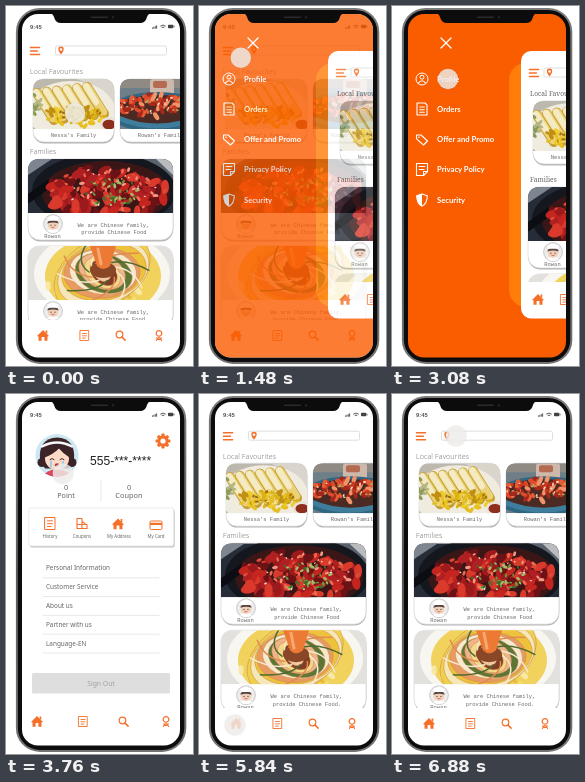
An HTML page that plays this animation: 187 by 360 pixels, repeating every 6.92 s.

```html
<!DOCTYPE html>
<html lang="en">
<head>
<meta charset="utf-8">
<title>Food app walkthrough</title>
<style>
html, body { margin: 0; width: 100%; height: 100%; overflow: hidden; background: #fff; }
svg { display: block; width: 187px; height: 360px; }
.sans { font-family: "Noto Sans", "Open Sans", sans-serif; }
.light { font-family: "Open Sans", sans-serif; font-weight: 300; letter-spacing: .16px; }
.serif { font-family: "Noto Serif", serif; }
.mono { font-family: "Liberation Mono", monospace; }
.bold { font-family: Lato, sans-serif; font-weight: 700; }
.arial { font-family: "Liberation Sans", Arial, sans-serif; }
.line { fill: none; stroke-linecap: round; stroke-linejoin: round; }
</style>
</head>
<body>
<svg id="stage" viewBox="0 0 187 360" xmlns="http://www.w3.org/2000/svg"></svg>
<script>
const LOOP = 6920;
const ORANGE = '#f4702a';

// ---- drawing helpers ----
const text = (x, y, s, cls, size, fill = '#666', anchor = 'start') =>
  `<text x="${x}" y="${y}" class="${cls}" font-size="${size}" fill="${fill}" text-anchor="${anchor}">${s}</text>`;
const rect = (x, y, w, h, r, fill, extra = '') =>
  `<rect x="${x}" y="${y}" width="${w}" height="${h}" rx="${r}" fill="${fill}" ${extra}/>`;
const circle = (x, y, r, fill, extra = '') =>
  `<circle cx="${x}" cy="${y}" r="${r}" fill="${fill}" ${extra}/>`;
const oval = (x, y, rx, ry, fill, extra = '') =>
  `<ellipse cx="${x}" cy="${y}" rx="${rx}" ry="${ry}" fill="${fill}" ${extra}/>`;
const line = (d, color = ORANGE, width = 1) =>
  `<path class="line" d="${d}" stroke="${color}" stroke-width="${width}"/>`;
const shape = (d, fill) => `<path d="${d}" fill="${fill}"/>`;
const at = (x, y, body) => `<g transform="translate(${x} ${y})">${body}</g>`;
const use = (id, x, y) => `<use href="#${id}" x="${x}" y="${y}"/>`;
const repeat = (n, fn) => Array.from({ length: n }, (_, i) => fn(i)).join('');

let seed = 7;
const rnd = (a, b) => {
  seed = (seed * 16807) % 2147483647;
  return a + (b - a) * seed / 2147483647;
};
// Scatters small tilted ovals inside an elliptical area.
const scatter = (n, cx, cy, w, h, size, colors) => repeat(n, i => {
  const a = rnd(0, 6.283), d = Math.sqrt(rnd(0, 1));
  const x = (cx + Math.cos(a) * d * w).toFixed(1), y = (cy + Math.sin(a) * d * h).toFixed(1);
  const r = rnd(size * .6, size);
  return oval(x, y, r.toFixed(1), (r * .55).toFixed(1), colors[i % colors.length],
    `transform="rotate(${rnd(0, 180).toFixed(0)} ${x} ${y})"`);
});

// ---- food pictures ----
const rolls = () =>
  rect(0, 0, 81, 51, 0, '#bdb8ae') +
  shape('M44 0 H81 V26 Q66 8 44 0Z', '#d9d5cd') +
  oval(38, 32, 44, 30, '#efebdf') +
  repeat(6, i => {
    const x = 4 + i * 10, y = 14 - i * 1.2;
    return line(`M${x} ${y} L${x + 17} ${y + 27}`, '#c59f35', 10) +
      line(`M${x} ${y} L${x + 16} ${y + 25}`, '#ead27a', 8.4) +
      line(`M${x - 1} ${y - 1} L${x + 9} ${y + 15}`, '#f4ebc4', 6);
  }) +
  scatter(60, 40, 38, 33, 10, 4, ['#dcb114', '#f0cb2c', '#c08f12', '#e8bf20']) +
  scatter(14, 46, 36, 24, 9, 2, ['#f6e7a0', '#9a6a14']) +
  scatter(10, 3, 30, 6, 16, 4, ['#8d9a58', '#b4b886']) +
  oval(76, 45, 9, 7, '#e9e2d8') + oval(76, 45.5, 6.5, 4.8, '#8e2f1e');

const skillet = () =>
  rect(0, 0, 81, 51, 0, '#6f7f88') +
  rect(0, 0, 81, 9, 0, '#8f8a84') +
  rect(30, 0, 24, 22, 3, '#cdb8ac') + rect(33, 2, 14, 7, 2, '#b56a52') +
  oval(38, 33, 50, 20, '#2f6681') + oval(38, 31, 45, 15, '#4a2a22') +
  scatter(70, 36, 27, 40, 11, 4.6, ['#c8371f', '#e65c34', '#f0956a', '#a3271a', '#dc4a2c']) +
  scatter(24, 36, 26, 36, 10, 1.7, ['#a8b465', '#f8dcc0']) +
  line('M-8 36 Q36 58 84 36', '#3f7d9c', 5);

const pan = () =>
  rect(0, 0, 145, 55, 0, '#262c38') +
  shape('M0 0 H24 L0 16Z', '#7d868f') + shape('M108 0 H145 V30Z', '#59616c') +
  shape('M128 0 H145 V16Z', '#b9bbbd') +
  oval(76, 32, 72, 38, '#14171d') + oval(78, 34, 64, 32, '#3a1716') +
  line('M0 40 L22 24', '#0b0d12', 8) +
  scatter(115, 80, 34, 62, 25, 8, ['#9c1a1c', '#c4251f', '#d93a2b', '#6b1216', '#b01f22']) +
  scatter(40, 80, 31, 58, 22, 3, ['#ef6a50', '#f29a84', '#e04a38']) +
  scatter(45, 82, 33, 30, 15, 2.5, ['#6f9440', '#a3bf68', '#46692e']) +
  scatter(14, 82, 31, 50, 18, 1.6, ['#f5ddd0']);

const spiral = () => {
  const tones = ['#f0cf4c', '#f6e7b8', '#eec23a', '#e79a62', '#f7e9cf', '#5d7636', '#efb48c', '#f3d88a', '#7e3d24', '#f1c9a6'];
  return rect(0, 0, 145, 57, 0, '#e3e1dd') +
    oval(74, 28, 68, 44, '#f8f6f1') + oval(75, 30, 58, 40, '#f1d25c') +
    scatter(36, 75, 40, 56, 18, 5, ['#f5dd74', '#e8bd3a', '#f8e8a6']) +
    tones.map((c, i) => oval(75 + (i % 3) - 1, 26 + (i % 2), 52 - i * 4.6, 34 - i * 2.9, c,
      `stroke="#c98a48" stroke-width=".5" transform="rotate(${i * 9 - 30} 75 26)"`)).join('') +
    repeat(10, i => {
      const a = i * .628;
      const p = (r, b) => `${(75 + Math.cos(a + b) * r).toFixed(1)} ${(26 + Math.sin(a + b) * r * .64).toFixed(1)}`;
      return line(`M${p(14, 0)} Q${p(32, .5)} ${p(46, 1.2)}`, ['#f7ead0', '#e08a50', '#4f6b30'][i % 3], 1.5);
    }) +
    oval(75, 24, 13, 8, '#8a4728') +
    shape('M62 0 Q75 -8 88 0 L82 20 Q75 26 69 20Z', '#ec7a35') +
    line('M70 3 L73 18', '#f7a870', 3);
};

// ---- icons, each centred on 0,0 ----
const icons = {
  menu: line('M-4.6 -3.5 H4.6 M-4.6 0 H2.4 M-4.6 3.5 H4.6', ORANGE, 1.4),
  pin: shape('M0 4 C-4 -.5 -3.2 -4 0 -4 C3.2 -4 4 -.5 0 4Z', ORANGE) + circle(0, -1.1, 1.3, '#fff'),
  home: shape('M-6 .4 L0 -5.4 L6 .4 L4.5 .9 V5.2 H1.4 V1.6 H-1.4 V5.2 H-4.5 V.9Z', ORANGE) + rect(2.6, -5, 1.7, 3, 0, ORANGE),
  doc: line('M-4.2 -5 H4.2 V5 H-4.2Z M-2 -2 H2 M-2 .3 H2 M-2 2.6 H.8', ORANGE, .9),
  find: circle(-1, -1, 3.3, 'none', `stroke="${ORANGE}" stroke-width="1.2"`) + line('M1.6 1.6 L4.6 4.6', ORANGE, 1.5),
  user: circle(0, -2.1, 2.8, 'none', `stroke="${ORANGE}" stroke-width="1.2"`) + line('M-2.6 5 Q0 -.8 2.6 5 M-2.3 2.4 Q0 5.8 2.3 2.4', ORANGE, 1.1),
  gear: repeat(8, i => `<rect x="-1.6" y="-7.4" width="3.2" height="4" rx=".7" fill="${ORANGE}" transform="rotate(${i * 45})"/>`) +
    circle(0, 0, 4.1, 'none', `stroke="${ORANGE}" stroke-width="3"`),
  chef: circle(0, 0, 9.4, '#efeceb', 'stroke="#b5b5b5" stroke-width=".7"') +
    shape('M-6 7 Q0 2 6 7 Q0 11 -6 7Z', '#fff') + oval(0, 1, 5.2, 4.8, '#f2d0b8') +
    shape('M-5.6 -.5 Q-5.6 -4 0 -4 Q5.6 -4 5.6 -.5 Q0 -2.5 -5.6 -.5Z', '#564743') +
    shape('M-4.4 -3.3 Q-7.5 -7 -3 -7.2 Q0 -10 3 -7.2 Q7.5 -7 4.4 -3.3Z', '#fff') +
    circle(-2, 1.2, .6, '#444') + circle(2, 1.2, .6, '#444') + line('M-1.3 3.4 Q0 4.2 1.3 3.4', '#b4473a', .6),
  girl: circle(0, 0, 21.5, '#cbe8f3') +
    shape('M-17 5 Q-19 -17 0 -18 Q19 -17 17 5 L12 13 H-12Z', '#3b2328') +
    circle(-15, 7, 4.5, '#3b2328') + circle(15, 7, 4.5, '#3b2328') +
    shape('M-12 18 Q0 9 12 18 Q0 25 -12 18Z', '#dc4658') + oval(0, 3, 12, 11.5, '#fbdac6') +
    shape('M-12.5 2 Q-11 -11 0 -11 Q11 -11 12.5 2 Q6 -2 2 -7 Q-4 -1 -12.5 2Z', '#3b2328') +
    line('M-15 -9 Q0 -17 15 -9', '#f5f7f8', 2.4) +
    line('M-7 4 Q-5 2 -3 4 M3 4 Q5 2 7 4', '#3b2328', 1) +
    line('M-6 6 V11 M6 6 V11', '#8ecbea', 1.7) + oval(0, 9.5, 2.3, 1.7, '#b83b42'),
};
const icon = (name, x, y) => use(name, x, y);

// ---- shared screen parts ----
const status = () =>
  `<text x="24" y="23.3" class="arial" font-size="5.8" font-weight="700" fill="#555">9:45</text>` +
  repeat(4, i => rect(146 + i * 1.4, 21.5 - i * .7, .9, 1.2 + i * .7, 0, '#444')) +
  line('M154.6 20 Q157 17.8 159.4 20 M156 21.4 Q157 20.5 158 21.4', '#444', .9) +
  rect(162, 18.8, 5.4, 3.4, .8, '#444') + rect(167.8, 19.8, .7, 1.4, .3, '#444');

const nav = (xs, y) => ['home', 'doc', 'find', 'user'].map((n, i) => icon(n, xs[i], y)).join('');

const card = (x, y, w, h, r, photo, clip) =>
  rect(x + .3, y + 1.4, w, h, r, '#b4b4b4') + rect(x, y, w, h, r, '#fff', 'stroke="#cfcfcf" stroke-width=".6"') +
  at(x, y, `<g clip-path="url(#${clip})">${use(photo, 0, 0)}</g>`);

const mono = (x, y, s) => text(x, y, s, 'mono', 5.45, '#6a6a6a', 'middle');

const dish = (x, y, photo, name) =>
  card(x, y, 81, 63, 11, photo, 'clipSmall') + mono(x + 40.5, y + 57.8, name);

const family = (y, photo, line2) =>
  card(22, y, 145, 81, 12, photo, 'clipLarge') +
  icon('chef', 47, y + 65) +
  mono(46.5, y + 79, 'Rowan') +
  mono(107.5, y + 67.6, 'We are Chinese family,') +
  mono(108, y + 75.4, line2);

const feed = (dy, gap, cls, size) =>
  text(24, 68.3 + dy, 'Local Favourites', cls, size) +
  dish(27, 73 + dy, 'rolls', "Nessa's Family") + dish(114, 73 + dy, 'skillet', "Rowan's Family") +
  text(24, 147.8 + dy + gap, 'Families', cls, size) +
  family(153 + dy + gap, 'pan', 'provide Chinese Food') +
  family(240 + dy + gap, 'spiral', 'provide Chinese Food.');

const header = (dy, searchX) =>
  icon('menu', 29, 45 + dy) +
  rect(searchX, 40 + dy, 111, 9, 1.5, '#fff', 'stroke="#d2d2d2" stroke-width=".7"') +
  icon('pin', searchX + 5.5, 44.6 + dy);

// ---- screens ----
const home = (headDy, feedDy) =>
  rect(14, 6, 162, 347, 0, '#fff') + status() + header(headDy, 49.5) +
  `<g clip-path="url(#clipFeed)">${feed(feedDy, 0, 'light', 7)}</g>` + nav([37, 78.5, 114.5, 153], 329.5);

const drawer = () => {
  const w = (d, x = 1.1) => line(d, '#fff', x);
  const rows = [
    ['Profile', 73, circle(0, 0, 6, 'none', 'stroke="#fff"') + circle(0, -1.8, 2, 'none', 'stroke="#fff"') + w('M-3.7 4.3 Q0 -.7 3.7 4.3')],
    ['Orders', 103, w('M-5 -6 H3 L5 -4 V6 H-5Z M-2.3 -2 H2.3 M-2.3 .7 H2.3 M-2.3 3.3 H2.3')],
    ['Offer and Promo', 133.5, w('M-5.5 -4.5 L-1 -4.5 L5.5 1.5 L1.5 5.5 L-5.5 -.7Z') + circle(-3, -2.3, .8, '#fff')],
    ['Privacy Policy', 163.5, w('M-5.5 -6 H5.5 V2 L1.5 6 H-5.5Z M1.5 6 V2 H5.5 M-2.8 -3 H2.8 M-2.8 0 H2')],
    ['Security', 194, w('M0 -6 L5.3 -4.2 Q5.3 3.5 0 6.3 Q-5.3 3.5 -5.3 -4.2Z') + shape('M0 -6 L-5.3 -4.2 Q-5.3 3.5 0 6.3Z', '#fff')],
  ];
  return rect(14, 6, 162, 347, 0, '#fa5c00') +
    rect(117, 57, 80, 244, 17, '#ff7d08') +
    rect(129, 45, 80, 267.5, 10, '#fff') +
    w('M49 32 L59 42 M59 32 L49 42', 1.3) +
    rows.map(([label, y, art]) => at(30, y, art) + text(45, y + 2.7, label, 'bold', 7.7, '#fff')).join('') +
    at(113, 22, header(0, 39)) +
    `<g clip-path="url(#clipMini)">${at(114, 22, feed(0, 6, 'serif', 6.7))}</g>` +
    nav([146, 173, 220, 260], 293.5);
};

const profile = () => {
  const rows = ['Personal Information', 'Customer Service', 'About us', 'Partner with us', 'Language-EN'];
  const mid = (x, y, s, size, fill) => text(x, y, s, 'sans', size, fill, 'middle');
  const tabs = [['History', 44], ['Coupons', 76], ['My Address', 113], ['My Card', 150]];
  return rect(14, 6, 162, 347, 0, '#fff') + status() +
    icon('gear', 157, 47) + icon('girl', 51, 61.5) +
    text(84, 71, '555-***-****', 'arial', 12.1, '#222') +
    mid(60, 95.6, '0', 7.4) + mid(60, 104, 'Point', 7.2) +
    mid(123, 95.6, '0', 7.4) + mid(123, 104, 'Coupon', 7.4) +
    line('M95 87 V107', '#ddd', .7) +
    rect(23.8, 115.5, 145, 38, 2, '#c9c9c9') + rect(22.8, 114, 145, 38, 2, '#fff', 'stroke="#ddd" stroke-width=".6"') +
    at(44, 129.5, line('M-5 -6 H5 V6 H-5Z M-2.5 -2.7 H2.5 M-2.5 .2 H2.5 M-2.5 3 H1', ORANGE, 1)) +
    at(76, 129.5, line('M-5 -5 H0 V5 H-5Z M0 -2 L3 0 V1 M-5 1 H5 V5 H0', ORANGE, 1.1)) +
    icon('home', 112, 130) +
    at(150, 131, rect(-6, -4, 12, 8.5, 1.2, 'none', `stroke="${ORANGE}"`) + rect(-6, -2.2, 12, 2.2, 0, ORANGE)) +
    tabs.map(([s, x]) => mid(x, 143.8, s, 4.4)).join('') +
    rows.map((s, i) => text(40, 176.4 + i * 19, s, 'sans', 6.4) + line(`M37 ${183.8 + i * 18.8} H153`, '#d8d8d8', .6)).join('') +
    rect(26, 279, 138, 20.5, 1.5, '#dedede') + mid(95, 291.5, 'Sign Out', 6.8, '#a2a2a2') +
    nav([31, 77, 117.5, 160], 327.5);
};

// ---- assembly ----
const clip = (id, x, y, w, h, r = 0) => `<clipPath id="${id}">${rect(x, y, w, h, r, '#000')}</clipPath>`;
const pictures = { rolls, skillet, pan, spiral };

// Each later screen dissolves over the one before it.
const screens = [
  { start: -1000, art: home(0, 0) },
  { start: 1240, art: drawer() },
  { start: 3240, art: profile() },
  { start: 5260, art: home(-2.8, -3.8) },
];
const FADE = 300;

document.getElementById('stage').innerHTML =
  `<defs>
    ${clip('clipScreen', 16, 8, 158, 343.5, 16)}
    ${clip('clipFeed', 14, 50, 162, 264)}
    ${clip('clipMini', 129, 76, 50, 200)}
    <clipPath id="clipSmall"><path d="M0 50 V11 Q0 0 11 0 H70 Q81 0 81 11 V50Z"/></clipPath>
    <clipPath id="clipLarge"><path d="M0 54 V12 Q0 0 12 0 H133 Q145 0 145 12 V54Z"/></clipPath>
    <linearGradient id="rim" x2="0" y2="1"><stop stop-color="#7c7c7c"/><stop offset=".5" stop-color="#5a5a5a"/><stop offset="1" stop-color="#747474"/></linearGradient>
    ${Object.entries(pictures).map(([id, draw]) => `<g id="${id}">${draw()}</g>`).join('')}
    ${Object.entries(icons).map(([id, art]) => `<g id="${id}">${art}</g>`).join('')}
  </defs>` +
  rect(10.9, 2.9, 168.4, 354, 23, '#0c0c0d', 'stroke="url(#rim)" stroke-width="2"') +
  `<g clip-path="url(#clipScreen)">
    ${screens.map(s => `<g class="screen">${s.art}</g>`).join('')}
    <g id="touch">${circle(0, 0, 10.8, '#777', 'opacity=".1"')}${circle(0, 0, 10.2, '#f1efee', 'opacity=".8"')}</g>
  </g>` +
  shape('M43 7 Q47 7.5 48 11 Q49.500 17 55 17 H134 Q139.500 17 141 11 Q142 7.500 146 7Z', '#0c0c0d') +
  rect(85, 10.6, 17, 1.5, .7, '#2b2b2d') + circle(107, 11.3, 1.2, '#20242e');

// ---- motion ----
const path = [
  [0, 69, 107], [260, 69, 107], [900, 29, 45], [1300, 29, 45], [2000, 106, 86], [2300, 106, 86],
  [2920, 56, 73], [3640, 56, 73], [4320, 66, 150], [4800, 58, 268], [4900, 58, 268],
  [5140, 33, 330], [5300, 35, 331], [5900, 36, 331], [6840, 64, 42], [LOOP, 64, 42],
];
const ease = k => k * k * (3 - 2 * k);
const clamp = k => Math.max(0, Math.min(1, k));

const touch = document.getElementById('touch');
const layers = [...document.querySelectorAll('.screen')];

function draw(t) {
  layers.forEach((el, i) => {
    const k = clamp((t - screens[i].start) / FADE);
    const covered = i + 1 < screens.length && t >= screens[i + 1].start + FADE;
    el.style.display = k > 0 && !covered ? '' : 'none';
    el.style.opacity = k;
  });
  const i = path.findIndex(p => p[0] > t);
  const [t0, x0, y0] = path[i - 1], [t1, x1, y1] = path[i];
  const k = ease((t - t0) / (t1 - t0));
  touch.setAttribute('transform', `translate(${(x0 + (x1 - x0) * k).toFixed(2)} ${(y0 + (y1 - y0) * k).toFixed(2)})`);
}

const begin = performance.now();
function tick() {
  draw((performance.now() - begin) % LOOP);
  requestAnimationFrame(tick);
}
tick();
</script>
</body>
</html>
```
